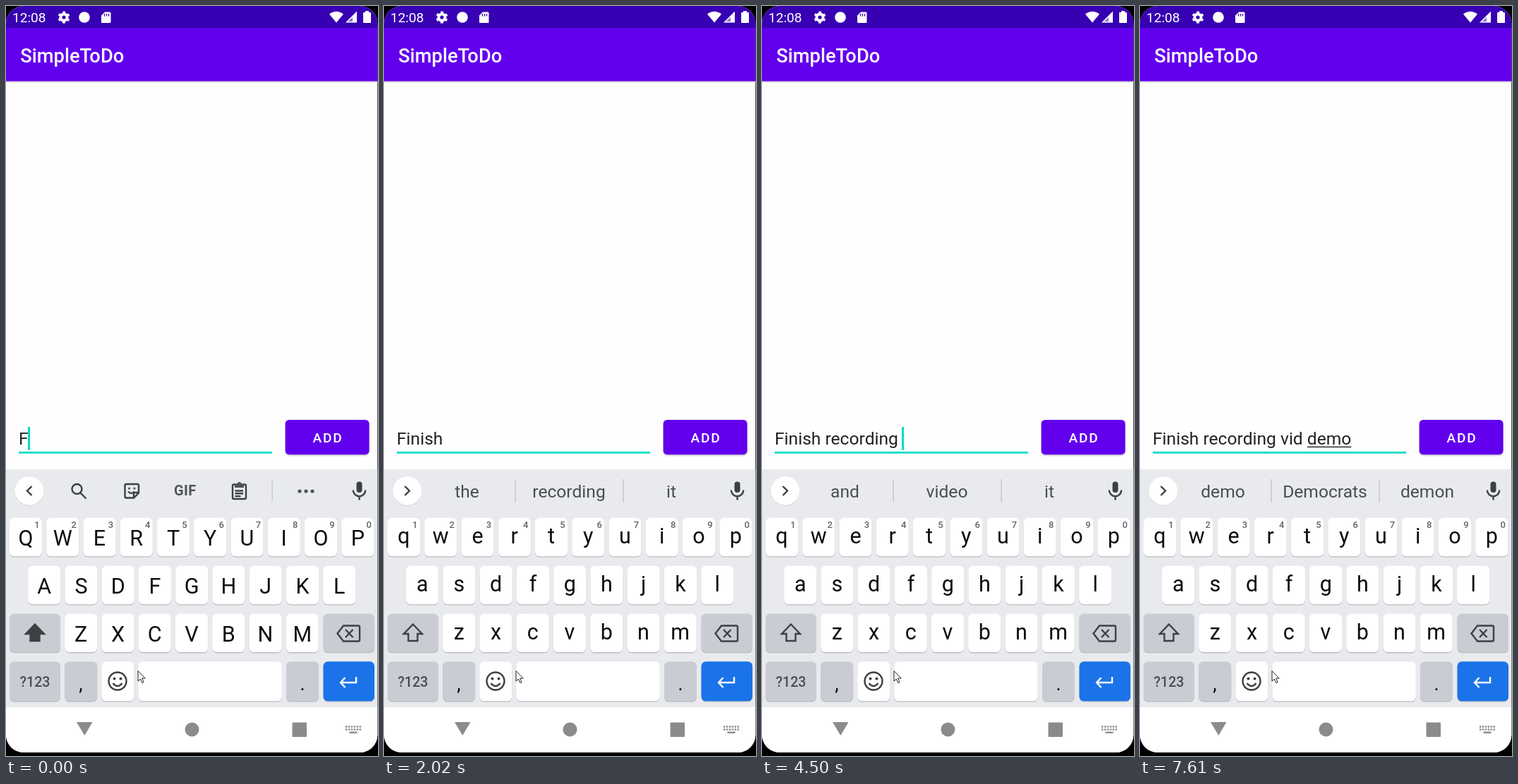
Write an HTML page that moves like this. It is 527x1062 px and loops after 8000 ms.

```html
<!DOCTYPE html>
<html lang="en">
<head>
<meta charset="utf-8">
<title>To-do typing</title>
<style>
  html, body { margin: 0; width: 100%; height: 100%; overflow: hidden; background: #000; }
  svg { display: block; width: 527px; height: 1062px; font-family: Roboto, sans-serif; }
  text { white-space: pre; text-rendering: optimizeLegibility; }
  .mid { text-anchor: middle; }
  .line { fill: none; stroke: #3c4043; stroke-width: 2.4; }
  .key { font-size: 30.5px; fill: #0c0c0d; }
  .hint { font-size: 13px; font-weight: 500; fill: #5f6368; }
  .word { font-size: 24.6px; fill: #4a4d51; }
</style>
</head>
<body>
<svg id="stage" viewBox="0 0 527 1062">
  <rect width="527" height="1062"/>
  <clipPath id="screen"><rect width="526.3" height="1057" rx="25"/></clipPath>
  <g clip-path="url(#screen)">
    <rect width="527" height="1062" fill="#fefefe"/>
    <rect y="106" width="527" height="2" fill="#d8d8d8"/>
    <rect y="108" width="527" height="1" fill="#f0f0f0"/>
    <rect y="31" width="527" height="75.5" fill="#6200ee"/>
    <rect width="527" height="31" fill="#3700b3"/>

    <g id="status" fill="#fff">
      <text x="9" y="22.5" font-size="19.1">12:08</text>
      <circle cx="82" cy="16" r="4.6" fill="none" stroke="#fff" stroke-width="4"/>
      <circle cx="82" cy="16" r="7" fill="none" stroke="#fff" stroke-width="3" stroke-dasharray="3.6 3.73" stroke-dashoffset="1.8" transform="rotate(30 82 16)"/>
      <circle cx="111" cy="16" r="7.8"/>
      <path d="M140 8.5h7q1.5 0 1.5 1.5v12.5q0 1.5-1.5 1.5h-10.5q-1.5 0-1.5-1.5v-9z"/>
      <path d="M139.5 11v3.500m3-3.500v3.500m3-3.500v3.500" stroke="#3700b3" stroke-width="1.3"/>
      <path d="M458 11.5q10-7.500 20 0l-10 12z"/>
      <path d="M497 7.500v16h-16z"/>
      <path d="M491 16v6h-6.500z" fill="#3700b3" opacity=".55"/>
      <path d="M509 9v-2h5v2h2q1 0 1 1v13q0 1-1 1h-9q-1 0-1-1v-13q0-1 1-1z"/>
    </g>
    <text x="20.3" y="80" font-size="27.3" font-weight="500" fill="#fff">SimpleToDo</text>

    <rect x="395.500" y="588" width="119" height="49.500" rx="5.500" opacity=".13"/>
    <rect x="395.600" y="586" width="119" height="49.200" rx="5.500" fill="#6200ee"/>
    <text class="mid" x="456" y="618.300" font-size="19.1" font-weight="500" letter-spacing="1.7" fill="#fff">ADD</text>

    <rect x="18" y="631" width="359" height="2.700" fill="#03dac5"/>
    <text id="entry" x="18" y="621.400" font-size="24.6" fill="#212121" xml:space="preserve"></text>
    <rect id="underline" y="623.700" height="1.400" fill="#212121"/>
    <rect id="caret" y="596" width="3" height="33" fill="#03dac5"/>

    <rect y="656" width="527" height="338" fill="#e8eaed"/>
    <circle cx="33" cy="687.500" r="20.300" fill="#d3d5d9"/>
    <circle cx="33" cy="686.500" r="20.300" fill="#fff"/>
    <path id="chevron" class="line"/>
    <g id="mic">
      <rect x="496.500" y="673.500" width="8" height="15.500" rx="4" fill="#3c4043"/>
      <path class="line" d="M491.800 685.500a8.700 8.700 0 0 0 17.400 0M500.500 694v5.500"/>
    </g>

    <g id="tools" fill="#4f5358">
      <circle class="line" cx="100.500" cy="684" r="7"/>
      <path class="line" d="M105.500 689.500l8 8"/>
      <path class="line" d="M170.500 677h15.500q2 0 2 2v10.500l-7 7h-10.500q-2 0-2-2v-15.500q0-2 2-2zM188 689h-5q-2 0-2 2v5.500M173 687.500q4.500 5 9 0"/>
      <circle cx="174.500" cy="683" r="1.600"/><circle cx="182" cy="683" r="1.600"/>
      <text class="mid" x="253.800" y="693" font-size="20" font-weight="700" letter-spacing=".4">GIF</text>
      <path class="line" d="M323 677.500h15q2 0 2 2v16.500q0 2-2 2h-15q-2 0-2-2v-16.500q0-2 2-2z"/>
      <path d="M324 677h3.500a3 3 0 0 1 6 0h3.500v5h-13z"/>
      <path class="line" d="M324.500 686.500h11.500m-11.500 3.800h11.500m-11.500 3.800h8"/>
      <rect x="376.500" y="672" width="1.300" height="29" fill="#c4c7cb"/>
      <circle cx="416" cy="687" r="2.600"/><circle cx="425" cy="687" r="2.600"/><circle cx="434" cy="687" r="2.600"/>
    </g>
    <g id="suggestions">
      <path d="M186 670v33M339 670v33" stroke="#bfc2c6" stroke-width="1.300"/>
      <text class="word mid" x="117.500" y="696.300"></text>
      <text class="word mid" x="262" y="696.300"></text>
      <text class="word mid" x="407" y="696.300"></text>
    </g>

    <g id="keys"></g>
    <path id="shift" class="line" d="M41 875.500L54 889h-6.500v10h-13v-10h-6.500z"/>
    <path class="line" d="M478 877.500h21q2 0 2 2v18q0 2-2 2h-21l-8.500-11zM481 883l10.500 11m0-11l-10.500 11"/>
    <text class="mid" x="41" y="964" font-size="19.600" font-weight="500" fill="#4a4d51">?123</text>
    <text class="mid key" x="106" y="969" style="font-size:27px">,</text>
    <text class="mid key" x="420" y="969" style="font-size:27px">.</text>
    <circle class="line" cx="158" cy="956" r="12.500"/>
    <circle cx="153.500" cy="952.500" r="2" fill="#3c4043"/><circle cx="162.500" cy="952.500" r="2" fill="#3c4043"/>
    <path class="line" d="M151.500 959q6.500 8 13 0"/>
    <path d="M496 950v8h-22m6.500-7l-6.500 7 6.500 7" fill="none" stroke="#fff" stroke-width="2.400"/>

    <rect y="993" width="527" height="70" fill="#fff"/>
    <g fill="#8b8b8b">
      <path d="M100 1014h22.500l-11.200 19z"/>
      <circle cx="263.500" cy="1024.500" r="10"/>
      <rect x="405.500" y="1014.500" width="20.500" height="20.500" rx="1"/>
      <path d="M481 1020.500h22m-22 4h22" stroke="#8b8b8b" stroke-width="2.400" stroke-dasharray="2.400 1.500"/>
      <rect x="486.500" y="1027.500" width="11" height="2.400"/>
    </g>
    <path d="M187 941.500v14.500l3.300-3 2.500 5.500 2.300-1-2.500-5.500h4.600z" fill="#fff" stroke="#222" stroke-width="1"/>
  </g>
</svg>
<script>
const $ = id => document.getElementById(id);
const LOOP = 8000, LEFT = 18;

// time, entry text, underlined letters of the last word, suggestions, caret hidden
const steps = [
  [0, 'F', 0, ''],
  [120, 'F', 1, 'F Finish From'],
  [240, 'Fi', 1, 'F Finish From'],
  [390, 'Fin', 2, 'Fi Finish Do'],
  [660, 'Fin', 3, 'Fin Finish Fun'],
  [940, 'Fini', 3, 'Fin Finish Fun'],
  [1190, 'Finis', 4, 'Fini Finish Finished'],
  [1340, 'Finish ', 5, 'Finis Finish Finishing'],
  [1620, 'Finish ', 0, 'the recording it'],
  [2020, 'Finish ', 0, 'the recording it', true],
  [2290, 'Finish r', 0, 'the recording it'],
  [2410, 'Finish r', 1, 'r recording rest'],
  [2680, 'Finish re', 1, 'r recording rest'],
  [2810, 'Finish re', 2, 're recording red'],
  [3090, 'Finish rec', 2, 'read recording record'],
  [3240, 'Finish rec', 3, 'react recording recordings'],
  [3490, 'Finish reco', 3, 'react recording recordings'],
  [3610, 'Finish recor', 4, 'reco recording record'],
  [3870, 'Finish record', 5, 'recor recording record'],
  [3990, 'Finish recordi', 6, 'record recording records'],
  [4110, 'Finish recordin', 7, 'recordi recording recordings'],
  [4230, 'Finish recording', 8, 'recordin recording recordings'],
  [4350, 'Finish recording ', 9, 'recording Recording recordings'],
  [4500, 'Finish recording ', 0, 'and video it'],
  [5030, 'Finish recording ', 0, 'and video it', true],
  [5440, 'Finish recording v', 0, 'and video it'],
  [5560, 'Finish recording v', 1, 'v video very'],
  [5680, 'Finish recording vi', 1, 'v video very'],
  [5800, 'Finish recording vi', 2, 'vi video visit'],
  [5920, 'Finish recording vid', 3, 'vi video visit'],
  [6070, 'Finish recording vid ', 3, 'vid video vide'],
  [6190, 'Finish recording vid ', 0, 'of by and'],
  [6470, 'Finish recording vid d', 0, 'of by and'],
  [6620, 'Finish recording vid de', 1, 'd doing done'],
  [6770, 'Finish recording vid dem', 2, 'de design dear'],
  [6920, 'Finish recording vid demo', 3, 'dem demo deal'],
  [7040, 'Finish recording vid demo', 4, 'dem demo deal'],
  [7190, 'Finish recording vid demo', 4, 'demo Democrats demon'],
  [7610, 'Finish recording vid demo', 4, 'demo Democrats demon', true]
];

function add(tag, attrs, text = '') {
  const node = document.createElementNS('http://www.w3.org/2000/svg', tag);
  for (const name in attrs) node.setAttribute(name, attrs[name]);
  node.textContent = text;
  return $('keys').appendChild(node);
}

function addKey(x, y, width, fill = '#fff', height = 54.5) {
  const shape = { x, width, height, rx: 6.5 };
  add('rect', { ...shape, y: y + 1.3, fill: '#b9bcc1' });
  add('rect', { ...shape, y, fill });
}

const GREY = '#c9ccd3', PITCH = 52.25;
const letters = [];
[['qwertyuiop', 28], ['asdfghjkl', 54.2], ['zxcvbnm', 106.2]].forEach(([row, start], r) => {
  const top = 724.8 + r * 67.9;
  [...row].forEach((char, i) => {
    const x = start + i * PITCH;
    addKey(x - 23, top, 46);
    letters.push({ char, top, node: add('text', { class: 'key mid', x }) });
    if (r === 0) add('text', { class: 'hint mid', x: x + 16, y: 739 }, (i + 1) % 10);
  });
});
addKey(5, 860.5, 72, GREY);
addKey(449.5, 860.5, 72.5, GREY);
[[5, 72, GREY], [83.2, 46, GREY], [135.3, 46], [187.3, 203.5], [397, 46, GREY], [449.5, 72.5, '#1a73e8']]
  .forEach(([x, width, fill]) => addKey(x, 928.3, width, fill, 56));

const entry = $('entry');
const advance = count => count ? entry.getSubStringLength(0, count) : 0;

const words = document.querySelectorAll('.word');
let shown = null;

function draw(time) {
  const step = steps.findLast(s => s[0] <= time);
  if (step === shown) return;
  shown = step;
  const [, text, marked, hints, hidden] = step;
  const upper = !hints;

  entry.textContent = text;
  const wordStart = text.trimEnd().lastIndexOf(' ') + 1;
  const from = advance(wordStart);
  $('underline').setAttribute('x', LEFT + from);
  $('underline').setAttribute('width', advance(wordStart + marked) - from);
  $('caret').setAttribute('x', Math.floor(LEFT + advance(text.length)));
  $('caret').style.display = hidden ? 'none' : '';

  $('tools').style.display = upper ? '' : 'none';
  $('suggestions').style.display = upper ? 'none' : '';
  hints.split(' ').forEach((hint, i) => words[i].textContent = hint);
  $('chevron').setAttribute('d', upper ? 'M36.5 680l-6.5 6.5 6.5 6.5' : 'M29.5 680l6.5 6.5-6.5 6.5');
  $('shift').style.fill = upper ? '#3c4043' : 'none';
  for (const { char, top, node } of letters) {
    node.textContent = upper ? char.toUpperCase() : char;
    node.setAttribute('y', top + (upper ? 39 : 36));
  }
}

function tick() {
  draw(performance.now() % LOOP);
  requestAnimationFrame(tick);
}
tick();
</script>
</body>
</html>
```
